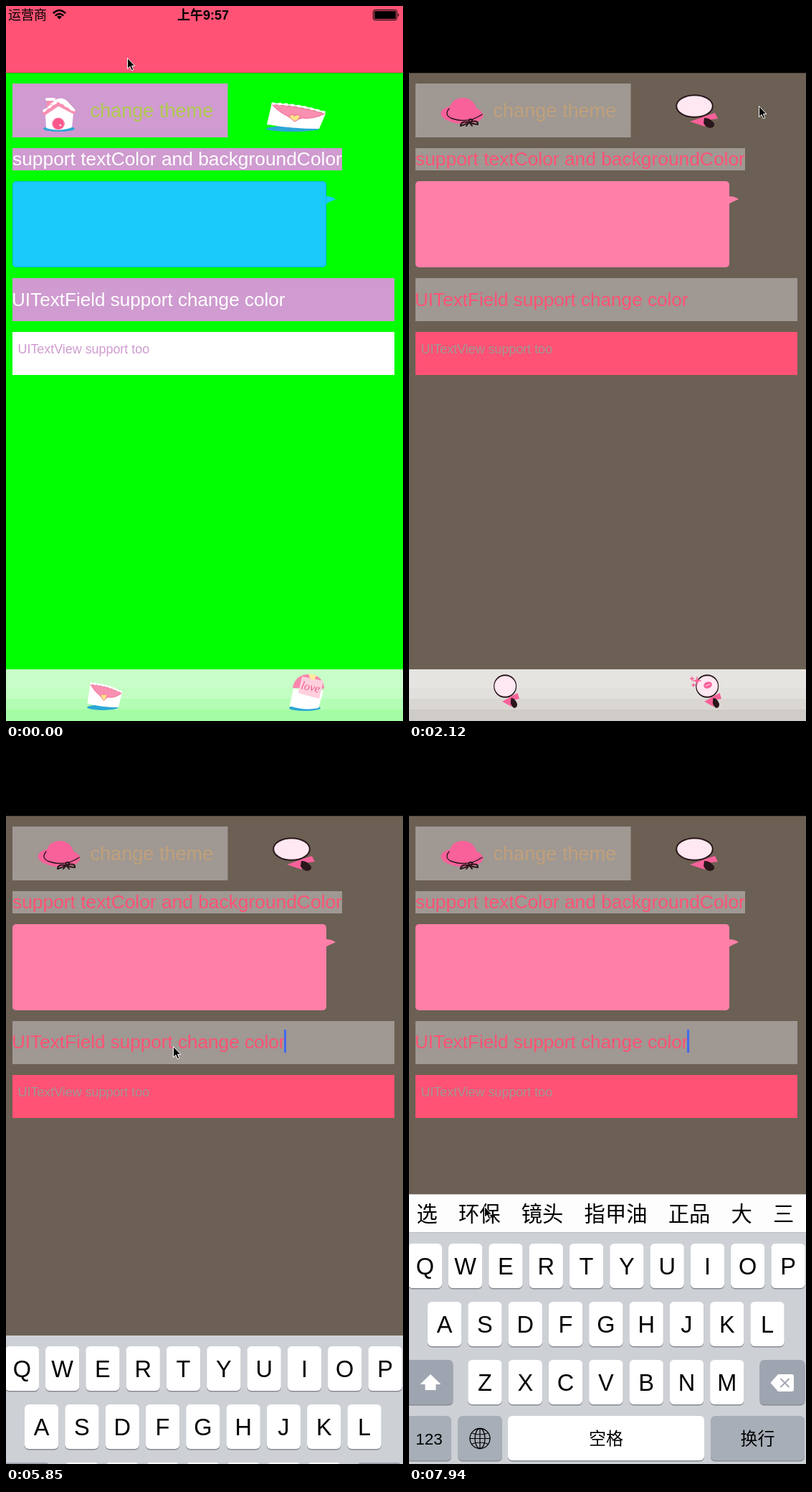
Animation of 554x996 px, one loop 8000 ms. Source, as an HTML page:

```html
<!DOCTYPE html>
<html lang="zh">
<head>
<meta charset="utf-8">
<title>Theme switch</title>
<style>
html, body { margin: 0; width: 100%; height: 100%; overflow: hidden; background: #000; }
svg { display: block; width: 100vw; height: 100vh; }
text { font-family: "Liberation Sans", "Noto Sans CJK SC", "Noto Sans CJK", sans-serif; white-space: pre; }
.mid { text-anchor: middle; }
.han { font-family: "Noto Sans CJK SC", "Noto Sans CJK", sans-serif; font-weight: 300; }
.love { font-family: "Liberation Serif", serif; font-style: italic; }
</style>
</head>
<body>
<svg id="stage" viewBox="0 0 554 996" preserveAspectRatio="none"></svg>
<script>
const LOOP = 8000, SWITCH = 930;
const rect = (x, y, w, h, fill, r = 0) =>
  `<rect x="${x}" y="${y}" width="${w}" height="${h}" rx="${r}" fill="${fill}"/>`;
const path = (d, fill, more = '') => `<path d="${d}" fill="${fill}" ${more}/>`;
const line = (d, color, w, more = '') =>
  path(d, 'none', `stroke="${color}" stroke-width="${w}" stroke-linecap="round" stroke-linejoin="round" ${more}`);
const oval = (x, y, rx, ry, fill, more = '') =>
  `<ellipse cx="${x}" cy="${y}" rx="${rx}" ry="${ry}" fill="${fill}" ${more}/>`;
const text = (s, x, y, size, fill, more = '') =>
  `<text x="${x}" y="${y}" font-size="${size}" fill="${fill}" ${more}>${s}</text>`;
const group = (body, more) => `<g ${more}>${body}</g>`;
const place = (body, x, y, sx = 1, sy = 1) =>
  group(body, `transform="translate(${x} ${y}) scale(${sx} ${sy})"`);

const blue = '#2ba7d6', rose = '#f98fb1', pink = '#f8619a', black = '#2a171c';
// Dashes over a thin line read as drips of snow
const drips = d => line(d, '#fff', 2) + line(d, '#fff', 3.5, 'stroke-dasharray="2 7"');

const house =
  oval(74, 171, 22, 4, blue) +
  path('M55 150L74 138L94 150L92 169Q74 176 56 170Z', '#fff') +
  rect(57, 131, 9, 13, rose) + line('M57 130H67', '#fff', 4) +
  line('M54 149L73 136L94 147', rose, 6) +
  path('M60 138L70 130Q78 126 85 132L97 145L93 146Q82 138 74 133Z', '#fff') +
  drips('M53 146L73 132L95 146') +
  oval(73, 164, 9, 8.5, rose) + oval(73, 164, 7.5, 7.5, '#f9568a') + oval(76, 166, 1.6, 1.6, '#ffd5e2');

const envelope =
  oval(37, 38, 37, 4, blue) +
  path('M8 2L83 17L74 38Q36 38 1 32Z', '#fff') +
  path('M8 4Q46 6 82 17Q66 25 50 23Q40 28 31 21Q18 15 8 4Z', rose, 'stroke="#f2668f"') +
  drips('M9 3Q46 4 81 15') +
  path('M40 28Q31 22 33 19Q37 17 40 20Q45 17 47 20Q48 24 40 28Z', '#ffe08a', 'stroke="#f2688f"');

const letter =
  oval(417, 978, 22, 4, blue) +
  path('M401 951L443 954L436 978Q416 982 396 975Z', '#fff') +
  path('M400 950Q404 930 424 931Q443 933 444 951Z', '#f987ad') +
  path('M413 934L443 940L437 965L408 957Z', '#ffcfdd') +
  path('M422 930L433 932L430 940L424 936Z', '#ffe9a0') +
  text('love', 411, 951, 16, '#ef5c8c', 'class="love" transform="rotate(12 411 951)"');

const hat =
  oval(74, 151, 29.5, 13, pink, 'transform="rotate(3 74 151)"') +
  path('M56 150Q56 128 76 128Q93 129 96 150Z', pink) +
  line('M56 143Q49 151 58 156Q82 165 102 151', black, 1.4) +
  line('M84 162Q72 160 72 167Q79 165 84 162Q82 157 88 158Q90 160 84 162Q97 158 96 165Q90 165 84 162L88 167M84 162L80 167', black, 2);

const mirror =
  path('M20 38L42 30L55 26L59 34L43 36L41 45Z', pink) +
  path('M40 33Q48 32 54 41Q55 46 48 47Q42 46 39 40Z', black) +
  oval(26.5, 16.5, 25.3, 15.3, '#ffe8f1', `stroke="${black}" stroke-width="2"`);

const star = (x, y, r) => line(`M${x - r} ${y}H${x + r}M${x} ${y - r}V${y + r}`, pink, 1.5) +
  oval(x, y, r / 2, r / 2, pink);
const kiss = oval(417, 946, 6, 4.5, pink, 'transform="rotate(-20 417 946)"') +
  line('M414 947L420 945', '#ffe0ec', 1) + star(402, 940, 5) + star(395, 937, 2.5) + star(397, 946, 2);

const snow = {
  id: 'snow', bar: '#ff5274', page: '#00ff00', panel: '#cf9bd0', ink: '#fff', title: '#b2ca52',
  bubble: '#19cafa', edge: '#10b3e4', view: '#fff', tabs: ['#c8ffc8', '#c3fec3', '#b4fdb4', '#a4fca4'],
  icons: house + place(envelope, 363, 133) + place(envelope, 113, 941, .59, .95) + letter
};
const ribbon = {
  id: 'ribbon', bar: '#000', page: '#6b6053', panel: '#9f9893', ink: '#ff5274', title: '#c0a07b',
  bubble: '#ff7fa9', edge: '#ff7fa9', view: '#ff5274', tabs: ['#e6e4e0', '#e2e0dc', '#dad7d3', '#cfcbc7'],
  icons: hat + place(mirror, 372, 123) + [118, 400].map(x => place(mirror, x, 931, .61, 1)).join('') + kiss
};

function screen(t) {
  return group(
    rect(0, 0, 554, 996, t.page) + rect(0, 0, 554, 93, t.bar) + rect(0, 93, 554, 1, 'rgba(0,0,0,.3)') +
    rect(9, 108, 300.5, 75, t.panel) + text('change theme', 117.5, 155, 27.1, t.title) +
    rect(9, 198, 460, 31, t.panel) + text('support textColor and backgroundColor', 9, 222, 26.35, t.ink) +
    path('M446 265Q456 265 460 269.5Q454 271 446 276Z', t.bubble) +
    rect(9, 244, 438, 120, t.edge, 5) + rect(10, 245, 436, 118, t.bubble, 4) +
    rect(9, 379, 533, 60, t.panel) +
    text('UITextField support change color', 8, 417.5, 26.1, t.ink, 'class="field"') +
    rect(9, 454, 533, 60, t.view) + text('UITextView support too', 16.5, 483.5, 17.9, t.panel) +
    t.tabs.map((c, i) => rect(0, [924, 950, 965, 980][i], 554, 72, c)).join('') + t.icons,
    `id="${t.id}"`);
}

const status =
  text('运营商', 3, 19, 18, '#000', 'class="han"') +
  line('M66.5 9.5Q74.5 2.5 82.5 9.5M69.5 13Q74.5 8.5 79.5 13', '#000', 2.4) +
  path('M74.5 18.5L71 15Q74.5 12 78 15Z', '#000') +
  text('上午9:57', 275, 19, 18, '#000', 'class="mid" font-weight="700"') +
  '<rect x="512.5" y="5.5" width="33" height="14" rx="2.5" fill="none" stroke="#000"/>' +
  rect(514, 7, 30, 11, '#000', 1) + path('M547 10Q549.5 12.5 547 15Z', '#000');

// Keyboard, measured from its own top edge
const dark = '#9fa5b0', gray = '#a7aeb8';
const key = (x, y, w, label = '', size = 32.5, fill = '#fff', type = '') =>
  rect(x, y + 1.5, w, 62, '#878b91', 6) + rect(x, y, w, 62, fill, 6) +
  text(label, x + w / 2, y + 31 + size * .38, size, '#000', `class="mid ${type}"`);
const row = (letters, x, y) => [...letters].map((c, i) => key(x + i * 56.3, y, 47.3, c)).join('');
const globe = [14, 7].map(r => oval(99, 286.5, r, 14, 'none', 'stroke="#000" stroke-width="1.3"')).join('') +
  line('M99 273V300M85 286.5H113M88 279Q99 283 110 279M88 294Q99 290 110 294', '#000', 1.2);
const words = ['选', '环保', '镜头', '指甲油', '正品', '大', '三'];
let wordX = 10.5;
const candidates = words.map(w => {
  const body = text(w, wordX, -16.5, 29.3, '#000', 'class="han"');
  wordX += w.length * 29.3 + 29.2;
  return body;
}).join('');
const keyboard =
  rect(0, 0, 554, 330, '#cdd0d5') +
  row('QWERTYUIOP', -1.3, 15) + row('ASDFGHJKL', 26, 96) + row('ZXCVBNM', 82.3, 177) +
  key(-6, 177, 67.5, '', 0, dark) + path('M30 197L44.5 211H37.5V219H22.5V211H15.5Z', '#fff') +
  key(489.5, 177, 63, '', 0, dark) + path('M504.5 209L515 197H534Q537 197 537 200V218Q537 221 534 221H515Z', '#fff') +
  line('M519 203.5L530 214.5M530 203.5L519 214.5', dark, 1.8) +
  key(-3, 255, 62, '123', 22.5, gray) + key(68.5, 255, 61.5, '', 0, gray) + globe +
  key(138, 255, 274, '空格', 24, '#fff', 'han') + key(421, 255, 131, '换行', 24, gray, 'han') +
  group(rect(0, -54, 554, 54, '#fdfdfd') + rect(0, -54, 554, 1, '#c9c9c9') + rect(0, -1, 554, 1, '#b9bcc1') +
    candidates, 'id="bar"');

const arrow = path('M.5 .5V15.5L4 12.3L6.4 17.8L8.8 16.8L6.5 11.4H10.8Z', '#000', 'stroke="#fff"');

const $ = id => document.getElementById(id);
$('stage').innerHTML = screen(snow) + screen(ribbon) + status +
  group(rect(388, 391, 3, 32, '#4169ee'), 'id="caret"') +
  group(keyboard, 'id="keys"') + group(arrow, 'id="cursor"');

const tickAt = t => t < SWITCH ? Math.floor(t / 150) : 6 + Math.floor((t - SWITCH) / 148.7);
const route = [
  [0, 169, 72], [1, 154, 137], [2, 154, 137], [3, 182, 150], [8, 182, 150], [10, 119, 45], [11, 200, 21],
  [14, 488, 139], [16, 406, 164], [18, 400, 205], [20, 361, 304], [27, 327, 514], [28, 197, 178],
  [30, 160, 180], [36, 233, 414], [42, 233, 414], [49, 65, 667], [53, 105, 637]
];
function cursorAt(n) {
  const i = route.findIndex(p => p[0] > n);
  if (i < 0) return route.at(-1).slice(1);
  const [n0, x0, y0] = route[i - 1], [n1, x1, y1] = route[i];
  const u = (n - n0) / (n1 - n0), e = u * (2 - u);
  return [x0 + (x1 - x0) * e, y0 + (y1 - y0) * e].map(Math.round);
}

const show = (id, on) => $(id).setAttribute('visibility', on ? 'visible' : 'hidden');
const move = (el, x, y) => el.setAttribute('transform', `translate(${x} ${y})`);
const fields = document.querySelectorAll('.field');

function draw(t) {
  const n = tickAt(t), typing = n - 39, editing = typing >= 0;
  show('snow', t < SWITCH);
  show('ribbon', t >= SWITCH);
  show('keys', editing);
  show('bar', typing >= 3);
  show('caret', editing && typing % 7 < 4);
  move($('keys'), 0, editing ? 674 + Math.round(143 * .145 ** typing) : 996);
  move($('cursor'), ...cursorAt(n));
  fields.forEach(f => move(f, 0, editing ? -1 : 0));
}

const start = performance.now();
function frame(now) {
  draw(Math.max(0, now - start) % LOOP);
  requestAnimationFrame(frame);
}
draw(0);
requestAnimationFrame(frame);
</script>
</body>
</html>
```
